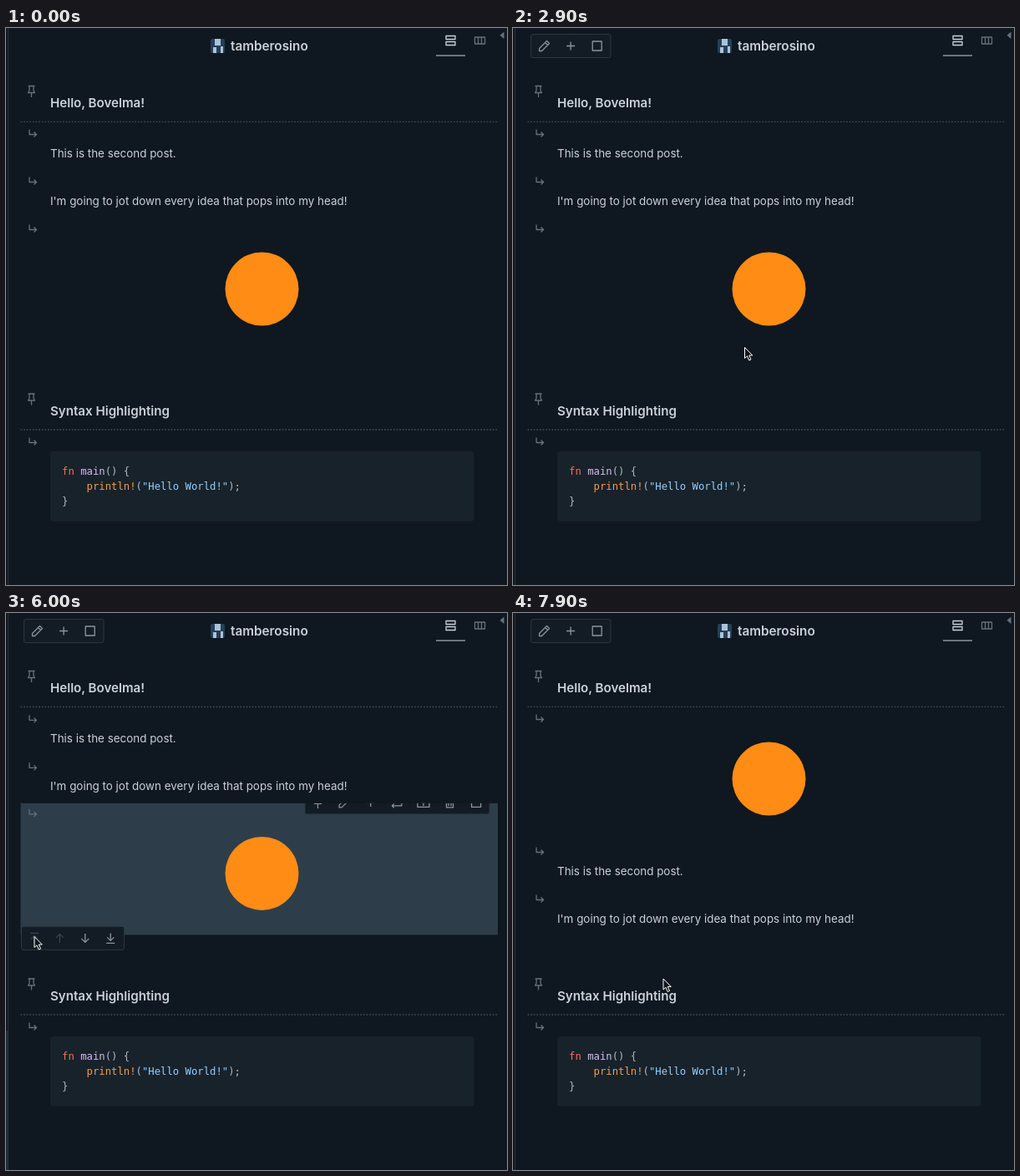
Recreate the animation shown at these times as an HTML page. Size 600 by 667 pixels, loop 8000 ms.

```html
<!DOCTYPE html>
<html lang="en">
<head>
<meta charset="utf-8">
<style>
  html, body { margin: 0; width: 100%; height: 100%; overflow: hidden; background: #0f1720; }
  svg { display: block; }
  text { font: 13.42px Inter, sans-serif; fill: #c9d1d9; white-space: pre; }
  .heading { font-size: 15.12px; font-weight: 600; }
  .name { font-size: 15.3px; font-weight: 600; }
  .code { font: 12.25px "DejaVu Sans Mono", monospace; fill: #adbac7; }
  .icon { fill: none; stroke: #8a959f; stroke-width: 1.3; stroke-linejoin: round; }
  .dim { stroke: #66717b; }
  .off { stroke: #39444d; }
  .active { stroke: #c9d1d9; }
  .bar { fill: #131c24; stroke: #2b3741; }
  .row { fill: #0f1720; }
  .hover .row { fill: #2d3e4a; }
  .tools { visibility: hidden; }
  .hover .tools { visibility: visible; }
  .dots { stroke: #3d4a54; stroke-width: 1.6; stroke-dasharray: 1.8 1.8; }
</style>
</head>
<body>
<script>
const LOOP = 8000, STEP = 100;
const MOVE_START = 5985, MOVE_TIME = 350;

const icons = {
  pencil: 'M-6 6V3L3-6L6-3L-3 6ZM1-4L4-1',
  plus: 'M-5 0H5M0-5V5',
  box: 'M-5.5-5.5H5.5V5.5H-5.5Z',
  pin: 'M-4-6.5H4M-2.5-6.5V-1L-4 1.5H4L2.5-1V-6.5M0 1.5V7',
  reply: 'M-4-4.5V1.5H4M1.5-1.5L4.5 1.5L1.5 4.5',
  repeat: 'M-5.5-1V-4H5.5M3.5-6.5L6-4L3.5-1.5M5.5 1V4H-5.5M-3.5 1.5L-6 4L-3.5 6.5',
  folder: 'M-7-5H-2L0-3H7V5.5H-7ZM0 4V-1M-2 1L0-1L2 1',
  trash: 'M-5-4.5H5M-2-4.5V-6H2V-4.5M-4-4.5V6H4V-4.5M-1.5-2V4M1.5-2V4',
  top: 'M-5-6H5M0 6V-3M-4 1L0-3L4 1',
  up: 'M0 5.5V-5M-4.5-.5L0-5L4.5-.5',
  down: 'M0-5.5V5M-4.5 .5L0 5L4.5 .5',
  bottom: 'M-5 6H5M0-6V3M-4-1L0 3L4-1',
  rows: 'M-5.5-5.5H5.5V-1.5H-5.5ZM-5.5 1.5H5.5V5.5H-5.5Z',
  columns: 'M-6-4H6V4H-6ZM-2-4V4M2-4V4'
};

const icon = (name, x, y, cls = '') =>
  `<path class="icon ${cls}" d="${icons[name]}" transform="translate(${x} ${y})"/>`;
const text = (x, y, s, cls = '') => `<text x="${x}" y="${y}" class="${cls}">${s}</text>`;
const bar = (x, y, w, names, firstX, gap = 31.6) =>
  `<rect class="bar" x="${x}" y="${y}" width="${w}" height="28" rx="2.5"/>` +
  names.map((n, i) => icon(n, firstX + i * gap, y + 14)).join('');
const heading = (y, s) => icon('pin', 30.5, y - 19, 'dim') + text(53, y, s, 'heading') +
  `<path class="dots" d="M17.5 ${y + 17.5}H589"/>`;
const row = (id, height, content) => `<g id="${id}">
  <rect class="row" x="17.5" width="571.5" height="${height}"/>
  ${icon('reply', 32, 13, 'dim')}${content}</g>`;
const tools = () => `<g class="tools">${
  bar(358, -13.5, 221, ['pin', 'pencil', 'plus', 'repeat', 'folder', 'trash', 'box'], 373.5)}</g>`;
const span = (color, s) => `<tspan fill="${color}">${s}</tspan>`;

document.body.innerHTML = `<svg width="600" height="667" viewBox="0 0 600 667">
  <rect width="600" height="667" fill="#0f1720"/>
  <rect id="side" y="500" width="2" height="167" fill="#11303d"/>
  <path d="M2.5 0V667" stroke="#26323b"/>
  <g id="paneTools">${bar(21.5, 7.5, 95.5, ['pencil', 'plus', 'box'], 37.5)}</g>
  <rect x="245" y="13" width="17" height="17" rx="2" fill="#263f57"/>
  <path d="M250 13h7v8h-7zM248 23h4v7h-4zM257 22h3v8h-3z" fill="#a9c4d8"/>
  ${text(269, 27, 'tamberosino', 'name')}
  ${icon('rows', 532.5, 15, 'active')}
  <path d="M515 33H550" stroke="#c9d1d9"/>
  ${icon('columns', 567.5, 15, 'dim')}
  <path d="M596.5 4.5V13L591.5 8.8Z" fill="#66717b"/>
  ${heading(95, 'Hello, Bovelma!')}
  ${heading(463.5, 'Syntax Highlighting')}
  ${row('code', 122, `
    <rect x="53" y="25" width="507.5" height="83.5" rx="3" fill="#18222a"/>
    ${text(67, 53, span('#f47067', 'fn') + ' ' + span('#dcbdfb', 'main') + '() {', 'code')}
    ${text(67, 71, '    ' + span('#f69d50', 'println!') + '(' + span('#96d0ff', '"Hello World!"') + ');', 'code')}
    ${text(67, 89, '}', 'code')}${tools()}`)}
  <g id="posts">
    ${row('second', 57, text(53, 41.5, 'This is the second post.'))}
    ${row('third', 57, text(53, 41.5, "I'm going to jot down every idea that pops into my head!"))}
    ${row('picture', 159, `<circle cx="306.5" cy="85.5" r="44" fill="#ff8c14"/>${tools()}
      <g class="tools" id="mover">${bar(18.5, 149, 123, ['top', 'up', 'down', 'bottom'], 34, 30.4)}</g>`)}
  </g>
  <path id="cursor" d="M0 0V13L3 10.3L5.2 15.5L7.5 14.5L5.3 9.5H9.3Z" fill="#10151a" stroke="#fff"/>
</svg>`;

const $ = id => document.getElementById(id);
const [code, posts, second, third, picture, cursor] =
  ['code', 'posts', 'second', 'third', 'picture', 'cursor'].map($);
const moverIcons = [...$('mover').querySelectorAll('.icon')];

// Pointer path: time, x, y
const path = [
  [1900, 396, 660], [2100, 375.5, 608], [2300, 340, 530], [2500, 300, 440], [2700, 281, 392],
  [2900, 277.5, 382.5], [3100, 296, 346], [3300, 310, 332], [3400, 310, 332], [3700, 250, 335],
  [4000, 140, 340], [4300, 74, 352], [4500, 60, 361], [4800, 46, 374], [5300, 34, 387.5],
  [6600, 34, 387.5], [6850, 170, 402], [7100, 312, 421], [7600, 312, 421], [7900, 180, 438]
];

function pointAt(t) {
  const i = Math.max(1, path.findIndex(p => p[0] >= t));
  const [t0, x0, y0] = path[i - 1], [t1, x1, y1] = path[i];
  const k = (t - t0) / (t1 - t0);
  return [x0 + (x1 - x0) * k, y0 + (y1 - y0) * k];
}

const place = (el, x, y) => el.setAttribute('transform', `translate(${x} ${y})`);
const show = (el, on) => { el.style.visibility = on ? 'visible' : 'hidden'; };
const within = (t, a, b) => t >= a && t < b;

function draw(now) {
  const t = Math.floor(now % LOOP / STEP) * STEP;
  const k = Math.min(1, Math.max(0, (t - MOVE_START) / MOVE_TIME));
  const p = k * k * (3 - 2 * k);
  const moving = k > 0 && k < 1;

  place(second, 0, 113 + 159 * p);
  place(third, 0, 170 + 159 * p);
  place(picture, 0, 227 - 114 * p);
  place(code, 0, 482);

  // The moved row slides beneath the others, then its tools rise on top again
  const next = moving ? second : null;
  if (picture.nextElementSibling !== next) posts.insertBefore(picture, next);

  const onCode = within(t, 2200, 2500), onPicture = within(t, 3000, 6700);
  code.classList.toggle('hover', onCode);
  picture.classList.toggle('hover', onPicture);
  show($('side'), onCode || onPicture);
  moverIcons.forEach((el, i) => el.classList.toggle('off', (i < 2) === (k > 0)));

  show($('paneTools'), t >= 1400);
  show(cursor, t >= 1900);
  if (t >= 1900) place(cursor, ...pointAt(t));
}

function frame() {
  draw(performance.now());
  requestAnimationFrame(frame);
}
frame();
</script>
</body>
</html>
```
